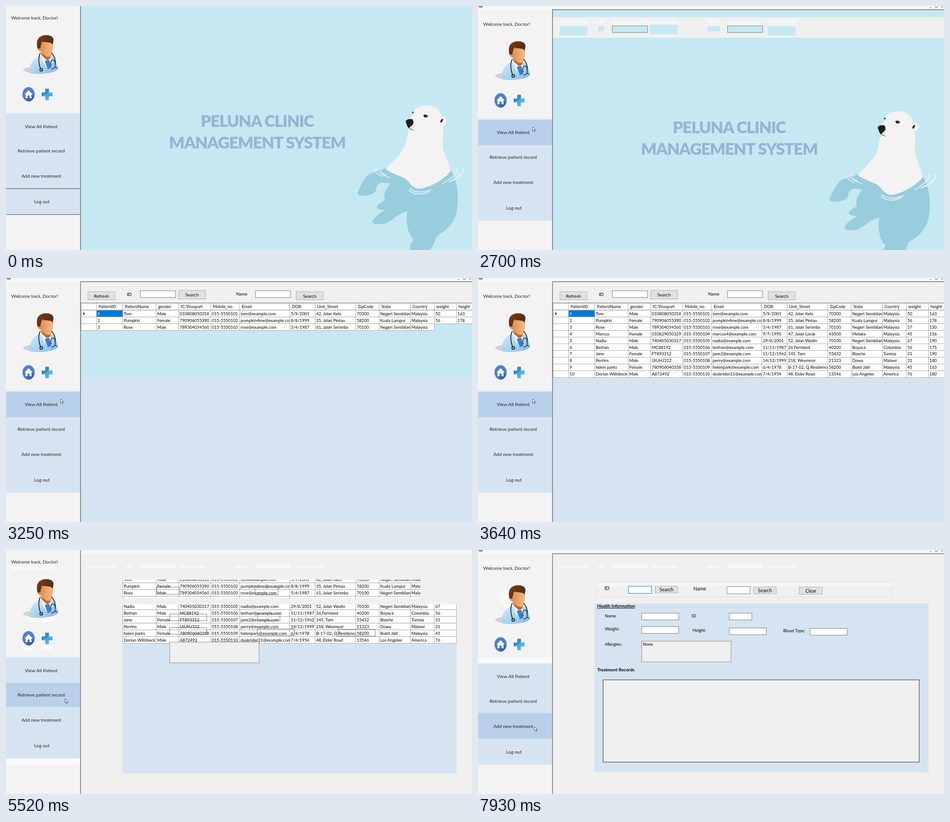
Recreate the animation shown at these times as an HTML page. Size 1032 px wide and 543 px high, loop 8000 ms.

```html
<!DOCTYPE html>
<html lang="en">
<head>
<meta charset="utf-8">
<title>Clinic management system</title>
<style>
html, body { margin: 0; width: 100%; height: 100%; overflow: hidden; background: #f0f0f0; }
svg { display: block; width: 1032px; height: 543px; font-family: Lato, "Open Sans", sans-serif; }
</style>
</head>
<body>
<svg id="stage" viewBox="0 0 1032 543"></svg>
<script>
const LOOP = 8000, BAR = 13.6, ROW = 14.95;
const SKY = '#c5e8f3', PALE = '#d6e4f1', GREY = '#f0f0f0', SIDE = '#f3f3f3';

const rect = (x, y, w, h, fill, extra = '') =>
  `<rect x="${x}" y="${y}" width="${w}" height="${h}" fill="${fill}" ${extra}/>`;
const text = (x, y, s, size = 9.4, extra = '') =>
  `<text x="${x}" y="${y + size * 0.36}" font-size="${size}" ${extra}>${s}</text>`;
const mid = (x, y, s, size, extra = '') => text(x, y, s, size, 'text-anchor="middle" ' + extra);
const shape = (d, fill, extra = '') => `<path d="${d}" fill="${fill}" ${extra}/>`;
const line = (d, color, w = 1) =>
  `<path d="${d}" fill="none" stroke="${color}" stroke-width="${w}" stroke-linecap="round"/>`;
const oval = (x, y, rx, ry, fill, extra = '') =>
  `<ellipse cx="${x}" cy="${y}" rx="${rx}" ry="${ry}" fill="${fill}" ${extra}/>`;
const group = (id, body) => `<g id="${id}">${body}</g>`;
const field = (x, y, w, h, fill = '#fff', color = '#7a7a7a') =>
  rect(x + .5, y + .5, w, h, fill, `stroke="${color}"`);
const button = (x, y, w, h, label, size = 10) =>
  field(x, y, w, h, '#e1e1e1', '#adadad') + mid(x + w / 2 + .5, y + h / 2 + 1, label, size);

/* Home screen */
function bear() {
  const water = 'M841 361C822 367 805 372 799 379C791 390 783 402 779 416C779 422 785 422 793 422C806 422 819 417 820 407C821 398 826 393 833 393L852 395C840 408 836 420 839 431C832 438 821 441 821 447C822 454 832 452 838 455C826 463 812 472 812 480C814 488 828 485 838 485C855 479 866 462 889 457C885 478 888 506 903 520C896 528 894 536 896 543L938 543C950 533 947 520 957 510C976 499 990 485 997 462C1003 435 1002 394 986 367Z';
  const body = 'M841 363C858 343 878 328 884 308C889 294 888 284 893 275L886 259C891 248 901 247 901 240C905 225 918 221 932 221C948 221 962 232 965 246C974 246 977 252 975 258C974 264 970 267 967 266C970 282 966 296 968 318C973 332 980 346 985 367C973 383 954 394 940 400C926 405 917 408 910 406C896 402 893 389 882 383C868 376 853 372 841 363Z';
  return shape(water, '#97cddd') + shape(body, SIDE) +
    shape('M885 257Q888 250 900 252Q905 260 900 265L895 269L893 272Q900 275 905 277Q892 275 889 268Z', '#231f20') +
    shape('M962 257Q963 251 968 251Q967 259 963 260Z', '#231f20') +
    oval(901, 237, 1.6, 2, '#231f20') + shape('M924 243Q930 239 935 245Q931 250 926 247Z', '#231f20') +
    oval(931, 244, 1, .8, '#fff') +
    line('M821 362Q820 371 851 382M829 362Q826 369 841 376M817 362Q816 374 834 379', '#eef8fb', 1.5) +
    line('M1012 360Q1021 374 981 392M999 362Q1002 375 966 396M1006 374Q1000 384 984 389', '#eef8fb', 1.7) +
    line('M894 406Q910 420 942 409M893 411Q912 425 938 413', '#eef8fb', 1.7);
}
const title = 'text-anchor="middle" fill="#99b3d2" font-weight="900" letter-spacing="-1.2"';
const home = text(556.5, 256.5, 'PELUNA CLINIC', 36, title) +
  text(556.5, 304, 'MANAGEMENT SYSTEM', 36, title) + bear();

/* Toolbar placeholders: x, width, y, height, boxed */
const slots = [[181, 61, 31, 21], [266, 13, 31, 12], [297, 78, 30, 15, 1], [381, 61, 28, 21],
  [508, 28, 31, 12], [552, 78, 30, 15, 1], [642, 61, 31, 21]];
const stub = rect(165, 11, 867, 46, GREY) + slots.map(([x, w, y, h, boxed]) =>
  rect(x, 17, w, 13, '#f4f4f4') + (boxed ? field(x, y, w, h, SKY) : rect(x, y, w, h, SKY))).join('');
const ghosts = rect(165, 0, 867, 9, '#f8f8f8') + slots.map(([x, w, y, h, boxed]) =>
  rect(x, boxed ? 30 : 35, w, boxed ? 10 : 5, '#f8f8f8')).join('');

/* Patient table */
const cols = [200, 258, 332, 382, 453, 517, 628, 684, 774, 826, 895, 948, 997, 1046];
const heads = 'PatientID|PatientName|gender|IC/Passport|Mobile_no|Email|DOB|Unit_Street|ZipCode|State|Country|weight|height'.split('|');
const rows = `1|Tom|Male|010808050318|015-5550101|tom@example.com|5/9/2001|42, Jalan Kelo|70300|Negeri Sembilan|Malaysia|50|163
2|Pumpkin|Female|790906055390|015-5550102|pumpkin4me@example.com|8/8/1999|35, Jalan Pintau|58200|Kuala Lumpur|Malaysia|56|178
3|Rose|Male|789304054560|015-5550103|rose@example.com|5/4/1987|61, Jalan Serimba|70100|Negeri Sembilan|Malaysia|57|150
4|Marcus|Female|010829050329|015-5550104|marcus4@example.com|9/7/1995|47, Jalan Lorak|43500|Melaka|Malaysia|45|156
5|Nadia|Male|740405030317|015-5550105|nadia@example.com|29/8/2001|52, Jalan Wadin|70100|Negeri Sembilan|Malaysia|67|190
6|Bethan|Male|MC88192|015-5550106|bethan@example.com|11/11/1987|26,Fernland|40200|Boyacá|Columbia|56|175
7|Jane|Female|FT893312|015-5550107|jane2@example.com|11/12/1962|145, Tarn|55432|Bizerte|Tunisia|31|190
8|Perrins|Male|UIUHJ312|015-5550108|perry@example.com|14/12/1999|218, Wexmoor|21323|Dowa|Malawi|31|180
9|helen parks|Female|780906040358|015-5550109|helenpark@example.com|6/4/1978|B-17-02, Q Residence|58200|Bukit Jalil|Malaysia|45|163
10|Dorian Willsbeck|Male|A872492|015-5550110|duskrider21@example.com|7/4/1954|48, Elder Road|13546|Los Angeles|America|76|180`
  .split('\n').map(r => r.split('|'));

const cellBox = (x, y, w, fill) => rect(x + .5, y, w, ROW, fill, 'stroke="#a5a5a5" stroke-width=".9"');
const cells = rows.map((row, i) => row.map((s, j) => {
  const y = 71.8 + i * ROW, picked = !i && !j;
  const edge = j ? '' : cellBox(166, y, 34, '#fff') + (i ? '' : shape('M171 76L175 79.5L171 83Z', '#333'));
  return `<g class="cell">${edge}${cellBox(cols[j], y, cols[j + 1] - cols[j], picked ? '#0078d7' : '#fff')}` +
    text(cols[j] + 2.7, y + 7.6, s, 9.4, picked ? 'fill="#fff"' : '') + '</g>';
}).join('')).join('');
const header = cellBox(166, 56, 34, '#fff') + heads.map((s, j) =>
  cellBox(cols[j], 56, cols[j + 1] - cols[j], '#fff') + text(cols[j] + 5, 64, s)).join('') +
  line('M166 55.5H1032', '#777');
const tools = rect(165, 8, 867, 47, GREY) + button(181, 30, 60, 18, 'Refresh') +
  text(268, 36, 'ID', 10, 'stroke="#000" stroke-width=".2"') + field(297, 28, 78, 15) +
  button(382, 27, 59, 19, 'Search') + text(510, 36, 'Name', 9.4) + field(552, 28, 78, 15) +
  button(642, 30, 60, 18, 'Search');
const grid = rect(165, 8, 867, 213, SKY) + rect(165, 221, 867, 340, PALE) +
  group('tools', tools) + group('header', header) + cells;

/* Record form */
const boxes = [[333, 80, 51, 16], [551, 81, 51, 16], [362, 140, 82, 15], [556, 140, 50, 15],
  [362, 170, 82, 15], [556, 173, 82, 15], [735, 174, 82, 15]];
const note = field(362, 202.5, 198, 46, GREY, '#8a8a8a');
const draft = boxes.map(b => field(...b, 'none', '#777')).join('') + note;
const panels = field(262, 70, 654, 34, GREY, '#dcdcdc') + rect(263, 71, 654, 9, '#f7f7f7') +
  rect(257.5, 119, 740.5, 375.5, PALE) + line('M358 266H997', '#e0eaf4') +
  rect(277, 289, 700, 183, GREY, 'stroke="#222"');
const bold = 'font-weight="700"';
const labels = [[280, 85, 'ID', 11], [477, 86.5, 'Name', 11], [281, 146.5, 'Name'], [473, 146.5, 'ID'],
  [281, 176, 'Weight:'], [475, 178.5, 'Height:'], [676, 180, 'Blood Type:'], [281, 210, 'Allergies:']];
const fields = boxes.map((b, i) => field(...b, '#fff', i ? '#7a7a7a' : '#0078d7')).join('') + note +
  button(392, 80, 50, 15, 'Search', 10.5) + button(610, 82, 50, 15, 'Search', 10.5) +
  button(711, 82, 51, 16, 'Clear', 10.5) +
  labels.map(([x, y, s, size = 9.4]) => text(x, y, s, size)).join('') +
  text(264, 124.5, 'Health Information', 9.9, bold + ' text-decoration="underline"') +
  text(264, 266, 'Treatment Records', 9.9, bold);

/* Sidebar */
function doctor() {
  return oval(66, 142, 28, 7, '#b9bcc0', 'opacity=".6"') +
    shape('M50 148C53 128 60 116 76 111L102 111C110 118 114 130 115 141C106 151 62 154 50 148Z', 'url(#coat)') +
    shape('M78 108L101 107L98 130L91 139L80 122Z', '#e4f3fd') +
    shape('M86 122L96 120L100 138L92 140Z', '#4179cf') +
    shape('M77 98L101 102L98 117L91 121L79 110Z', '#c66a2c') +
    shape('M70 80C71 74 103 72 104 82C105 94 104 106 96 113C88 114 80 107 77 101C71 101 69 92 70 88Z', 'url(#skin)') +
    shape('M70 95C66 80 69 67 86 65C97 64 106 68 105 76C105 81 103 83 104 87C100 79 91 82 80 79C78 84 77 88 76 94Z', 'url(#hair)') +
    line('M76 105C70 116 73 131 77 141M101 105C108 112 110 120 109 129', '#26303a', 2) +
    line('M100 133C97 124 101 118 105 120C110 124 110 131 108 136L114 138M108 137L101 141', '#26303a', 1.5) +
    oval(78, 142, 4, 4, '#26303a') + oval(78, 142, 1.8, 1.8, '#c3d3df');
}
const homeIcon = oval(50, 196.5, 13.6, 16, '#4e80d0') +
  shape('M50 188L62 203C59 210 54 213 49 212.5L44 205Z', '#3a63ad') +
  shape('M50 187L59 197H56.5V205H52V199H48V205H43.5V197H41Z', '#fff');
const plusIcon = shape('M87 184H95V192.5H103V201H95V209.5H87V201H79V192.5H87Z', 'url(#plus)') +
  shape('M87 184H95V192.5L79 201V192.5H87Z', '#2c86bd', 'opacity=".75"');
const stops = [239, 296, 349.3, 406, 464];
const menu = [['View All Patient', 268], ['Retrieve patient record', 322.3], ['Add new treatment', 378.5], ['Log out', 435.5]];
const side = rect(0, -14, 164, 580, SIDE) +
  group('halo', oval(78, 93, 30, 28, '#f9f9f9') + oval(50, 183, 13, 12, '#f9f9f9') +
    rect(0, 225, 164, 14, '#f9f9f9') + rect(12, 9, 100, 9, '#f7f7f7')) +
  group('halo2', oval(78, 146, 37, 15, '#fafafa') + oval(50, 212, 13, 14, '#fafafa') +
    rect(80, 210, 22, 12, '#fafafa') + rect(0, 464, 164, 14, '#fafafa') + rect(12, 37, 98, 8, '#f9f9f9')) +
  text(11.5, 26.5, 'Welcome back, Doctor!', 10.1, 'fill="#222"') + doctor() + homeIcon + plusIcon +
  rect(0, 239, 164, 225, PALE) +
  group('hover', rect(0, 0, 164, 1, '#b9d0ea', 'id="hoverBox"')) +
  menu.map(([s, y], i) => mid(i === 3 ? 79.5 : 78, y, s, 10.4, 'fill="#222"')).join('') +
  group('focus', line('M0 406.5H164M0 464H164', '#3a3a3a', 1.2));

const bar = rect(0, 0, 1032, 7.5, '#f8f8f8') + rect(2, 0, 3, 3, '#c0504d') + rect(5, 0, 5, 4, '#8794a6') +
  line('M165 8.2H1032', '#555', 1.2) +
  line('M1000.5 3.5H1004M1013.5 0V3.5H1017V0M1026.5 0L1030 3.5M1030 0L1026.5 3.5', '#555', .8);

const ramp = (id, a, b, dir = 'x2="1" y2="1"') =>
  `<linearGradient id="${id}" ${dir}><stop stop-color="${a}"/><stop offset="1" stop-color="${b}"/></linearGradient>`;
const stage = document.getElementById('stage');
stage.innerHTML = '<defs>' + ramp('coat', '#d5edfb', '#7fbbe8') + ramp('skin', '#d98243', '#f6bd8b', 'x2="1" y2="0"') +
  ramp('hair', '#7a3f1c', '#4b220e') + ramp('plus', '#3395cf', '#62bcec') +
  `<clipPath id="strips">${rect(258, 66, 659, 41, '#000')}${rect(258, 121, 740, 376, '#000')}</clipPath></defs>` +
  rect(0, 0, 1032, 543, SKY, 'id="back"') + group('home', home) + group('stub', stub) + group('ghosts', ghosts) +
  group('gridClip', group('grid', grid)) + `<g id="draft" transform="translate(0 2)">${draft}</g>` +
  group('panels', panels) + group('fields', fields) + group('none', text(365, 210, 'None')) +
  group('caret', line('M335.5 82V95', '#000')) +
  group('side', side) + group('bar', bar) +
  '<path id="edge" stroke="#555" stroke-width="1.2"/>' +
  group('cursor', shape('M0 0V9.2L2.1 7.3L3.6 10.7L5.2 10L3.7 6.8H6.6Z', '#fff', 'stroke="#222" stroke-width=".8"'));

const el = id => document.getElementById(id);
const show = (id, on) => el(id).style.display = on ? '' : 'none';
const drop = (id, y) => el(id).setAttribute('transform', `translate(0 ${y})`);
const cellNodes = [...stage.querySelectorAll('.cell')];

/* Pointer stops: time, x, y; it moves in steps of about 80 ms */
const stopsAt = [[180, 960, 502], [910, 160, 277], [1150, 121, 269], [4100, 121, 269],
  [4580, 131, 331], [7370, 131, 331], [7930, 125, 393], [LOOP, 125, 393]];
function pointer(t) {
  const i = Math.max(1, stopsAt.findIndex(s => t < s[0]));
  const [t0, x0, y0] = stopsAt[i - 1], [t1, x1, y1] = stopsAt[i];
  const n = Math.round((t1 - t0) / 80);
  const u = Math.max(0, Math.floor((t - t0) / (t1 - t0) * n + 1e-6) / n);
  const e = u * u * (3 - 2 * u);
  return [x0 + (x1 - x0) * e, y0 + (y1 - y0) * e];
}

let painted = -1;
function paintCells(t) {
  const step = Math.floor((t - 2860) / 78);
  const n = Math.max(0, Math.min(cellNodes.length, Math.round(37 + 18.6 * (step - 5))));
  if (n === painted) return;
  painted = n;
  cellNodes.forEach((c, i) => c.style.display = i < n ? '' : 'none');
}

function draw(t) {
  const framed = t >= 2700 && t < 5290 || t >= 5760;
  const dy = framed ? BAR : 0, late = t >= 5520;
  el('back').setAttribute('fill', late ? GREY : SKY);
  ['home', 'stub', 'side'].forEach(id => drop(id, dy));
  drop('grid', dy - BAR);
  show('home', t < 2860);
  show('stub', t >= 2080 && t < 2938);
  show('ghosts', late);
  show('grid', t >= 2860 && t < 5760);
  show('tools', t >= 2938);
  show('header', t >= 3016);
  el('gridClip').setAttribute('clip-path', late ? 'url(#strips)' : 'none');
  paintCells(t);
  show('draft', late && t < 5840);
  show('panels', t >= 5840);
  show('fields', t >= 5990);
  show('none', t >= 6220);
  show('caret', t >= 6220 && Math.floor((t - 6220) / 540) % 2 === 0);
  show('halo', t >= 5760);
  show('halo2', t >= 5290 && t < 5760);
  show('focus', t < 1680);
  show('bar', framed);
  el('edge').setAttribute('d', `M165 ${framed ? 8 : 0}V543`);

  const [x, y] = pointer(t);
  show('cursor', t >= 180);
  el('cursor').setAttribute('transform', `translate(${x} ${y})`);
  const item = x < 164 ? stops.findIndex((s, i) => y - dy >= s && y - dy < stops[i + 1]) : -1;
  show('hover', item >= 0);
  if (item >= 0) {
    el('hoverBox').setAttribute('y', stops[item]);
    el('hoverBox').setAttribute('height', stops[item + 1] - stops[item]);
  }
}

function tick(now) {
  draw(now % LOOP);
  requestAnimationFrame(tick);
}
draw(0);
requestAnimationFrame(tick);
</script>
</body>
</html>
```
